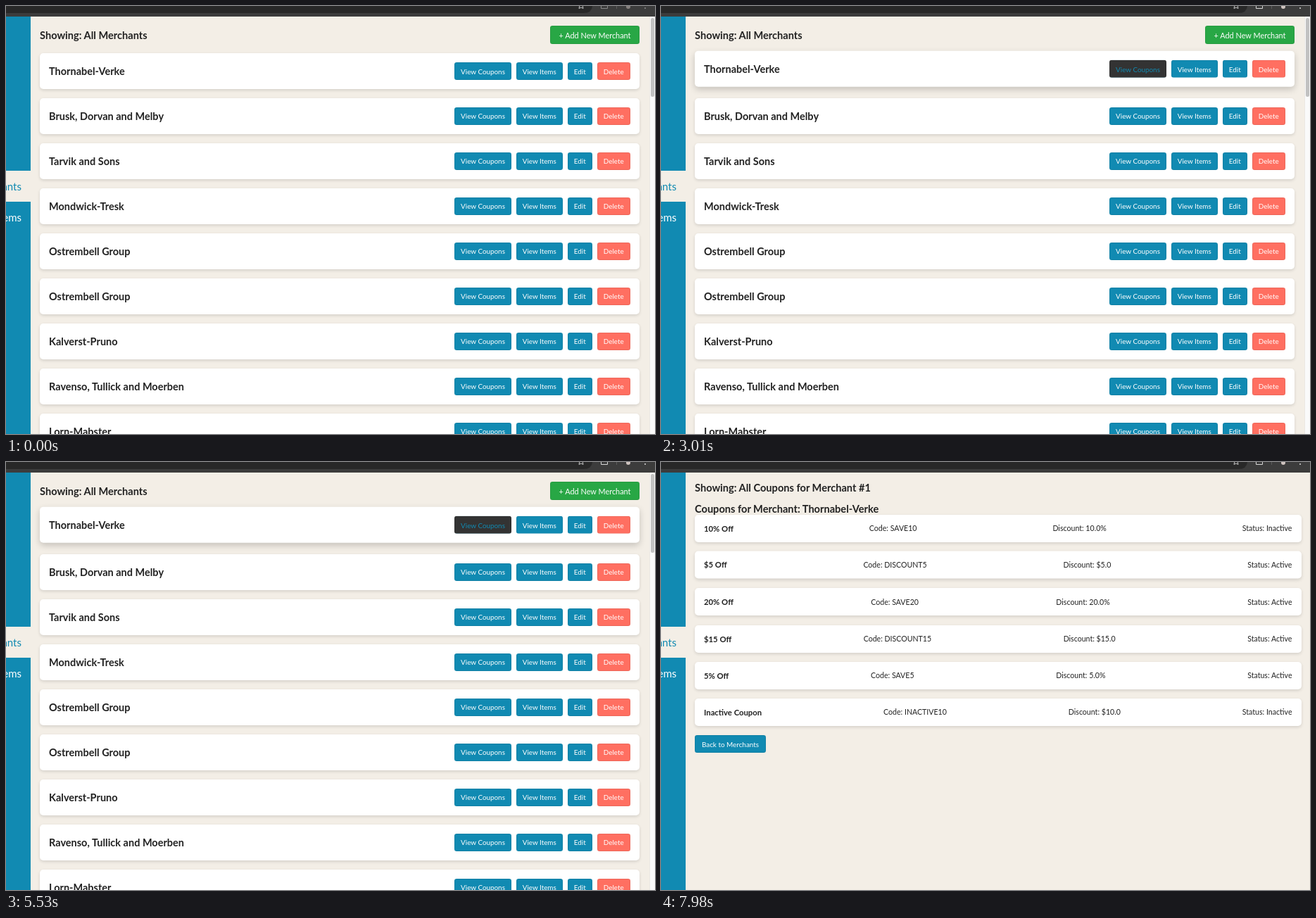
An HTML page for the animation above (8000 ms loop, 922x608 px).

```html
<!DOCTYPE html>
<html lang="en">
<head>
<meta charset="utf-8">
<title>Merchants and coupons</title>
<style>
  html, body { margin: 0; width: 100%; height: 100%; overflow: hidden; }
  body { position: relative; background: #f3eee6; color: #222; font: 10.6px Lato, "Open Sans", sans-serif; white-space: nowrap; }
  body *, .page { box-sizing: border-box; }
  .page, .box, .bar, .side, h2 { position: absolute; }
  .page { inset: 0; }
  .bar { left: 0; top: 0; width: 100%; }
  .side { left: 0; top: 15px; width: 35px; bottom: 0; background: #118ab2; overflow: hidden; }
  .side div { position: absolute; right: 0; padding-right: 13px; height: 44px; font-size: 15px; line-height: 44px; color: #fff; }
  .side .on { top: 219px; background: #f3eee6; color: #118ab2; }
  h2 { left: 48px; margin: 0; font-size: 14.6px; line-height: 20px; }
  .card {
    --h: 0;
    position: absolute; left: 48px; padding: 0 13px; display: flex; align-items: center;
    justify-content: space-between; background: #fff; border-radius: 5px;
    transform: translateY(calc(var(--h) * -3.3px));
    box-shadow: 0 calc(1.7px + var(--h) * 2px) calc(4px + var(--h) * 6px) rgb(0 0 0 / calc(.13 + var(--h) * .06));
  }
  .shop { width: 852px; height: 51px; font-size: 14.5px; }
  .coupon { width: 861.5px; height: 39.2px; }
  .coupon b { font-size: 11.3px; }
  .buttons { display: flex; gap: 6.5px; }
  .btn {
    --h: 0; --c: #118ab2;
    height: 25px; border-radius: 3.3px; font-size: 9.9px; color: #fff;
    display: flex; align-items: center; justify-content: center;
    background: linear-gradient(rgb(51 51 51 / var(--h)) 0 0), var(--c);
    box-shadow: inset 0 0 0 1px rgb(0 0 0 / .07);
  }
  .btn.over { color: #118ab2; }
  .track { right: 0; top: 15px; width: 8px; bottom: 0; background: #fafafa; border-left: 1px solid #ebe8e3; }
  .thumb { right: 1px; top: 17px; width: 5px; height: 112px; border-radius: 3px; background: #c1c1c1; }
</style>
</head>
<body>
<div class="page" id="shops">
  <h2 style="top:32px">Showing: All Merchants</h2>
  <div class="box btn" style="--c:#28a745;left:773px;top:28px;width:127px;height:26px;font-size:10.9px">+ Add New Merchant</div>
  <div class="box track"></div>
  <div class="box thumb"></div>
</div>
<div class="page" id="coupons">
  <h2 style="top:27px">Showing: All Coupons for Merchant #1</h2>
  <h2 style="top:57px">Coupons for Merchant: Thornabel-Verke</h2>
  <div class="box btn" style="left:48px;top:388px;width:101px">Back to Merchants</div>
</div>
<div class="side"><div class="on">Merchants</div><div style="top:263px">Items</div></div>
<svg class="bar" width="922" height="15">
  <path fill="#3c3c3c" d="M0 0H922V15H0z"/>
  <path fill="#282828" d="M0 0H833Q832 10 821 10H0z"/>
  <path d="M814.8 0L814 3.5L817 2L820 3.5L819.2 0" fill="none" stroke="#c8c8c8"/>
  <path d="M867.5 0V4" stroke="#5c5c5c"/>
  <g id="icons">
    <path d="M845.5 0V3.5H854.5V0" fill="none" stroke="#d8d8d8"/>
    <circle cx="884" cy="1" r="3" fill="#cfc4c0"/>
    <circle cx="908" cy="3" r="1" fill="#d8d8d8"/>
  </g>
</svg>
<script>
const LOOP = 8000, FADE = 300, SWITCH = 6300;
const $ = id => document.getElementById(id);

function add(parent, cls, html = '', css = '') {
  const el = document.createElement('div');
  el.className = cls;
  el.innerHTML = html;
  el.style.cssText = css;
  parent.append(el);
  return el;
}

const shops = ['Thornabel-Verke', 'Brusk, Dorvan and Melby', 'Tarvik and Sons', 'Mondwick-Tresk',
  'Ostrembell Group', 'Ostrembell Group', 'Kalverst-Pruno', 'Ravenso, Tullick and Moerben', 'Lorn-Mabster'];
const actions = [['View Coupons', 81], ['View Items', 66.5], ['Edit', 35.5], ['Delete', 47.5, '#ff6f61']];
const shopCards = shops.map((name, i) => {
  const card = add($('shops'), 'card shop', `<b>${name}</b>`, `top:${67 + 63.95 * i}px`);
  const row = add(card, 'buttons');
  for (const [label, width, color = '#118ab2'] of actions)
    add(row, 'btn', label, `width:${width}px;--c:${color}`);
  return card;
});

const coupons = [
  ['10% Off', 'SAVE10', '10.0%', 'Inactive'], ['$5 Off', 'DISCOUNT5', '$5.0', 'Active'],
  ['20% Off', 'SAVE20', '20.0%', 'Active'], ['$15 Off', 'DISCOUNT15', '$15.0', 'Active'],
  ['5% Off', 'SAVE5', '5.0%', 'Active'], ['Inactive Coupon', 'INACTIVE10', '$10.0', 'Inactive']];
const couponCards = coupons.map(([name, code, off, status], i) => add($('coupons'), 'card coupon',
  `<b>${name}</b><span>Code: ${code}</span><span>Discount: ${off}</span><span>Status: ${status}</span>`,
  `top:${74.9 + 52.2 * i}px`));

// Each hoverable element with the [enter, leave] times of the pointer
const [view, items, edit, del] = shopCards[0].querySelectorAll('.btn');
const hovers = [
  [shopCards[0], [2215, LOOP]],
  [view, [2700, 3460], [5230, LOOP]],
  [items, [3540, 4070], [5120, 5200]],
  [edit, [4115, 4520], [5040, 5090]],
  [del, [4590, 5010]],
  [couponCards[0], [6270, 7255]],
  [couponCards[1], [7940, LOOP]],
];

// CSS "ease": cubic-bezier(.25, .1, .25, 1)
function ease(x) {
  if (x <= 0) return 0;
  if (x >= 1) return 1;
  const bez = (s, a, b) => 3 * s * (1 - s) ** 2 * a + 3 * s * s * (1 - s) * b + s ** 3;
  let lo = 0, hi = 1;
  for (let i = 0; i < 20; i++) {
    const mid = (lo + hi) / 2;
    if (bez(mid, .25, .25) < x) lo = mid; else hi = mid;
  }
  return bez(lo, .1, 1);
}

const level = (t, [enter, leave]) =>
  ease((Math.min(t, leave) - enter) / FADE) * (1 - ease((t - leave) / FADE));

function draw(t) {
  $('shops').style.visibility = t < SWITCH ? 'visible' : 'hidden';
  $('coupons').style.visibility = t < SWITCH ? 'hidden' : 'visible';
  $('icons').style.opacity = t < 1750 ? .5 : 1;
  for (const [el, ...spans] of hovers) {
    el.style.setProperty('--h', Math.max(...spans.map(s => level(t, s))).toFixed(4));
    el.classList.toggle('over', spans.some(([a, b]) => t >= a && t < b));
  }
}

const start = performance.now();
function tick() {
  draw((performance.now() - start) % LOOP);
  requestAnimationFrame(tick);
}
tick();
</script>
</body>
</html>
```
